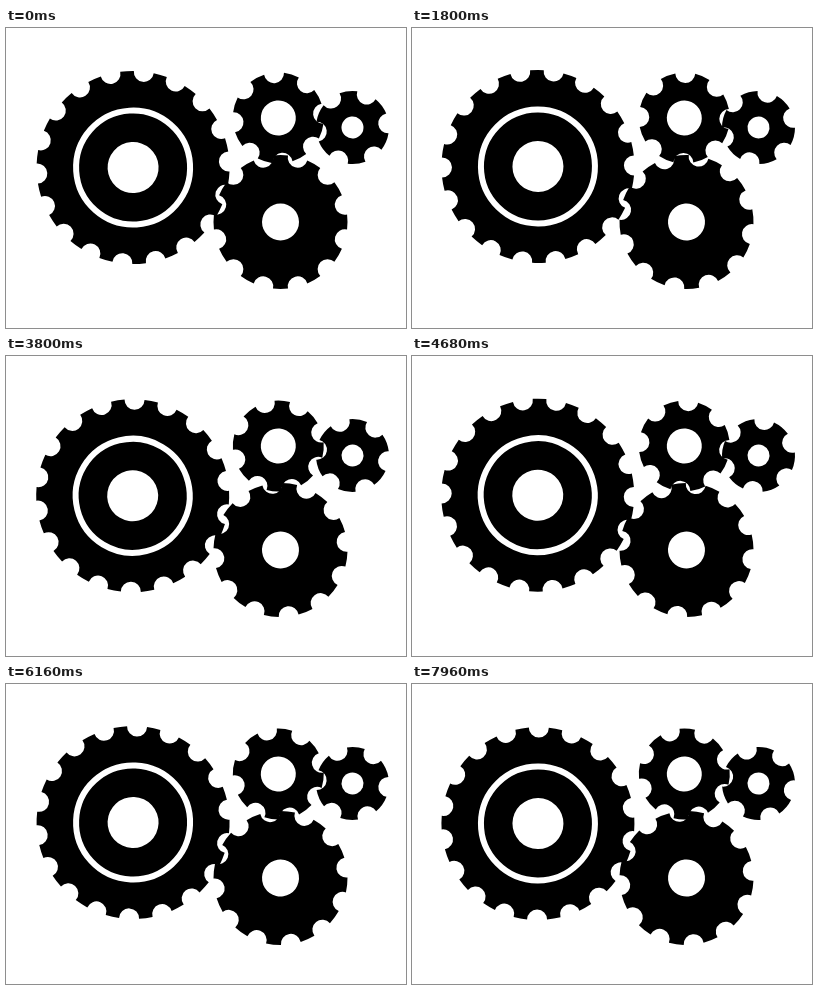
These frames come from a looping animation (400 by 300 pixels, 8000 ms). An HTML page:

```html
<!DOCTYPE html>
<html lang="en">
<head>
<meta charset="utf-8">
<title>Gears</title>
<style>
  html, body { margin: 0; width: 100%; height: 100%; overflow: hidden; background: #fff; }
  svg { display: block; width: 100%; height: 100%; }
</style>
</head>
<body>
<svg id="stage" viewBox="0 0 400 300"></svg>
<script>
const LOOP = 8000, STEP = 40;
const NOTCH = 10, INSET = 0.5;

// Slightly uneven pace: [ms, teeth passed]
const pace = [[0, 0], [1800, 9.15], [2680, 14.01], [6880, 35.48], [8000, 40.9]];

// start: angle of one tooth from the top; dir: 1 is clockwise; off: how far the disc sits off its axle
const gears = [
  { x: 126.5, y: 139, r: 96.5, teeth: 18, hole: 25.5, ring: 57, start: -3.6, dir: 1, off: 0.55 },
  { x: 274.5, y: 194, r: 67, teeth: 12, hole: 18.5, start: 0, dir: -1, off: 0 },
  { x: 272.3, y: 90, r: 45.5, teeth: 8, hole: 17.5, start: -28, dir: 1, off: 0 },
  { x: 346.5, y: 99.5, r: 36.5, teeth: 6, hole: 11, start: -6.6, dir: -1, off: 0 }
];

const stage = document.getElementById('stage');

function add(parent, tag, attrs) {
  const el = document.createElementNS('http://www.w3.org/2000/svg', tag);
  for (const key in attrs) el.setAttribute(key, attrs[key]);
  return parent.appendChild(el);
}

// Disc with round bites cut from its rim; a tooth points straight up
function outline({ r, teeth }) {
  const c = r - INSET;
  const half = Math.acos((r * r + c * c - NOTCH * NOTCH) / (2 * r * c));
  const pitch = 2 * Math.PI / teeth;
  const at = a => `${(r * Math.sin(a)).toFixed(2)} ${(-r * Math.cos(a)).toFixed(2)}`;
  let d = `M${at(half - pitch / 2)}`;
  for (let i = 0; i < teeth; i++) {
    const mid = (i + 0.5) * pitch;
    d += `A${r} ${r} 0 0 1 ${at(mid - half)}A${NOTCH} ${NOTCH} 0 0 0 ${at(mid + half)}`;
  }
  return d + 'Z';
}

for (const gear of gears) {
  const axle = add(stage, 'g', { transform: `translate(${gear.x} ${gear.y})` });
  gear.body = add(axle, 'g', {});
  const disc = add(gear.body, 'g', { transform: `translate(${gear.off} ${gear.off})` });
  add(disc, 'path', { d: outline(gear) });
  if (gear.ring) add(disc, 'circle', { r: gear.ring, fill: 'none', stroke: '#fff', 'stroke-width': 6 });
  add(disc, 'circle', { r: gear.hole, fill: '#fff' });
}

function teethPassed(time) {
  const next = pace.findIndex(([t]) => t > time);
  const [t0, n0] = pace[next - 1], [t1, n1] = pace[next];
  return n0 + (n1 - n0) * (time - t0) / (t1 - t0);
}

function draw(time) {
  const passed = teethPassed(Math.floor((time % LOOP) / STEP) * STEP);
  for (const { body, teeth, start, dir } of gears) {
    const angle = start + dir * passed * 360 / teeth;
    body.setAttribute('transform', `rotate(${angle.toFixed(3)})`);
  }
}

let origin;
function tick(now) {
  origin ??= now;
  draw(now - origin);
  requestAnimationFrame(tick);
}
draw(0);
requestAnimationFrame(tick);
</script>
</body>
</html>
```
